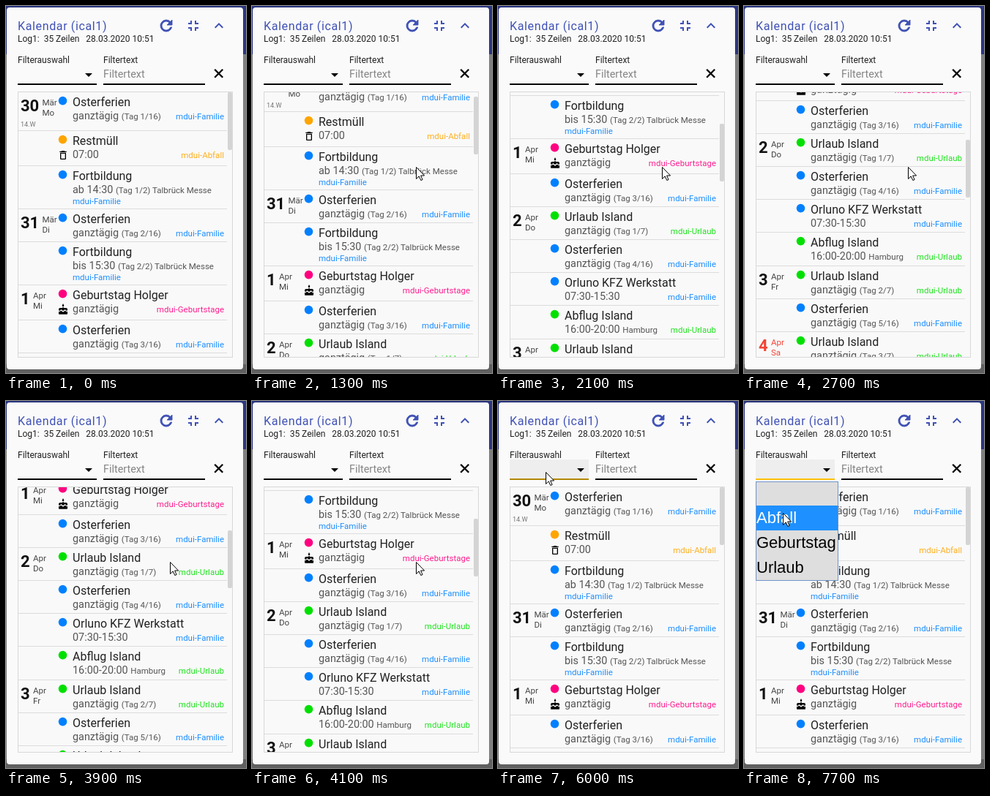
These frames come from a looping animation (328 px wide and 502 px high, 8000 ms). An HTML page:

```html
<!DOCTYPE html>
<html lang="de">
<head>
<meta charset="utf-8">
<title>Kalendar</title>
<style>
html, body { margin: 0; width: 100%; height: 100%; overflow: hidden; background: #808080; }
svg { display: block; }
text { font-family: Roboto, sans-serif; font-size: 12px; fill: #212121; white-space: pre; }
.title { font-size: 16px; }
.sub { font-size: 14.4px; fill: #555; }
.small { font-size: 11.52px; }
.tag { opacity: .88; }
.day { font-size: 22px; font-weight: 700; fill: #111; }
.head { font-size: 16px; letter-spacing: .04em; fill: #3f51b5; }
.option { font: 22px "Liberation Sans", Arial, sans-serif; fill: #000; }
</style>
</head>
<body>
<svg width="328" height="502" viewBox="0 0 328 502">
  <rect width="328" height="502" fill="#808080"/>
  <rect y="490" width="328" height="12" fill="#606060"/>
  <rect width="328" height="66" fill="#2b3780"/>
  <rect x="1" y="2" width="323" height="495" rx="4" fill="#fafafa"/>

  <text class="head" x="16" y="33">Kalendar (ical1)</text>
  <text x="16" y="49">Log1:&#160; 35 Zeilen&#160;&#160; 28.03.2020 10:51</text>
  <g fill="#3f51b5">
    <path transform="translate(207 15)" stroke="#3f51b5" stroke-width=".9" d="M17.65 6.35A8 8 0 1 0 19.73 14h-2.08A6 6 0 1 1 16.22 7.78L13 11h7V4z"/>
    <path transform="translate(244 15)" d="M5 16h3v3h2v-5H5zM8 8H5v2h5V5H8zM14 19h2v-3h3v-2h-5zM16 8V5h-2v5h5V8z"/>
    <path transform="translate(279 15)" d="M12 8l-6 6 1.4 1.4 4.6-4.6 4.6 4.6L18 14z"/>
  </g>

  <text x="16" y="78">Filterauswahl</text>
  <text x="133" y="78">Filtertext</text>
  <rect id="selectFill" x="16" y="80" width="108" height="26" fill="#eee"/>
  <rect id="selectLine" x="16" y="106" width="108" height="2"/>
  <path d="M108 92h10l-5 5z"/>
  <text x="133" y="98" style="font-size:14.4px;fill:#858585">Filtertext</text>
  <rect x="133" y="106" width="139" height="2"/>
  <path d="M285.2 86.7l11 11m0-11l-11 11" stroke="#000" stroke-width="2.3"/>

  <rect x="16.5" y="117.5" width="293" height="363" fill="#f9f9f9" stroke="#d8d8d8"/>
  <svg x="17" y="118" width="292" height="362"><g id="rows"></g></svg>
  <rect id="thumb" x="303" width="6" height="79" rx="2" fill="#d4d4d4"/>

  <g id="popup">
    <rect x="16.5" y="110.5" width="112" height="135" fill="#dedede" stroke="#6f93c8"/>
    <rect id="highlight" x="17" width="111" height="34" fill="#1e90ff"/>
    <text class="option" id="abfall" x="17" y="167">Abfall</text>
    <text class="option" x="17" y="201">Geburtstag</text>
    <text class="option" x="17" y="235">Urlaub</text>
  </g>
  <path id="cursor" d="M.5.5v16l3.7-3.6 2.6 5.6 2.3-1-2.5-5.5h5z" fill="#fff" stroke="#000"/>
</svg>
<script>
const $ = id => document.getElementById(id);

const COLORS = { Familie: '#0080ff', Abfall: '#ffa500', Geburtstage: '#ff0080', Urlaub: '#00e000' };
const ICONS = {
  trash: 'M6 19a2 2 0 0 0 2 2h8a2 2 0 0 0 2-2V7H6zM8 9h8v10H8zM15.5 4l-1-1h-5l-1 1H5v2h14V4z',
  cake: 'M12 0l-2 4a2 2 0 0 0 4 0zM11 7h2v2h5a3 3 0 0 1 3 3v2l-2 1-3-3-4 3-4-3-3 3-2-1v-2a3 3 0 0 1 3-3h5z' +
    'M3 16.5h2l3-2 4 3 4-3 3 2h2V21a1 1 0 0 1-1 1H4a1 1 0 0 1-1-1z'
};

// Each event: height, category, title, time, note, and optional extras.
const event = (height, category, title, time, note = '', extra = {}) =>
  ({ height, category, title, time, note, ...extra });
const holiday = (n, extra, height = 45) =>
  event(height, 'Familie', 'Osterferien', 'ganztägig', `(Tag ${n}/16)`, extra);
const trip = (n, extra) =>
  event(45, 'Urlaub', 'Urlaub Island', 'ganztägig', `(Tag ${n}/7)`, extra);
const course = (n, time) =>
  event(59, 'Familie', 'Fortbildung', time, `(Tag ${n}/2) Talbrück Messe`, { wrap: true });

const EVENTS = [
  holiday(1, { date: '30 Mär Mo', week: '14.W' }, 53),
  event(48, 'Abfall', 'Restmüll', '07:00', '', { icon: 'trash' }),
  course(1, 'ab 14:30'),
  holiday(2, { date: '31 Mär Di' }),
  course(2, 'bis 15:30'),
  event(48, 'Geburtstage', 'Geburtstag Holger', 'ganztägig', '', { date: '1 Apr Mi', icon: 'cake' }),
  holiday(3),
  trip(1, { date: '2 Apr Do' }),
  holiday(4),
  event(45, 'Familie', 'Orluno KFZ Werkstatt', '07:30-15:30'),
  event(45, 'Urlaub', 'Abflug Island', '16:00-20:00', 'Hamburg'),
  trip(2, { date: '3 Apr Fr' }),
  holiday(5),
  trip(3, { date: '4 Apr Sa', red: true })
];
const ROW_FRACTION = .047; // row heights are slightly over a whole pixel

function dateMarkup({ date, week, red }) {
  if (!date) return '';
  const [day, month, weekday] = date.split(' ');
  const x = day.length > 1 ? 32.5 : 20;
  const fill = color => `style="fill:${red ? '#f44336' : color}"`;
  return `<text class="day" x="3" y="26" ${fill('#111')}>${day}</text>
    <text class="small" x="${x}" y="18" ${fill('#444')}>${month}</text>
    <text class="small" x="${x}" y="32" ${fill('#444')}>${weekday}</text>` +
    (week ? `<text x="3" y="47" style="font-size:9px;fill:#777">${week}</text>` : '');
}

function rowMarkup(e, top, bottom) {
  const color = COLORS[e.category];
  const tagPlace = e.wrap ? 'x="74" y="52"' : 'x="281" y="37" text-anchor="end"';
  return `<g transform="translate(0 ${top})">${dateMarkup(e)}
    <circle cx="60.5" cy="11.6" r="5.8" fill="${color}"/>
    ${e.icon ? `<path transform="translate(53 25) scale(.667)" fill-rule="evenodd" d="${ICONS[e.icon]}"/>` : ''}
    <text class="title" x="74" y="19">${e.title}</text>
    <text class="sub" x="74" y="37">${e.time} <tspan class="small">${e.note}</tspan></text>
    <text class="small tag" ${tagPlace} style="fill:${color}">mdui-${e.category}</text>
    <rect y="${bottom - top - 1}" width="285" height="1" fill="#dcdcdc"/></g>`;
}

let offset = 0;
$('rows').innerHTML = EVENTS.map(e => {
  const top = Math.round(offset);
  offset += e.height + ROW_FRACTION;
  return rowMarkup(e, top, Math.round(offset));
}).join('');

const clamp = v => Math.max(0, Math.min(1, v));
const smooth = v => v * v * (3 - 2 * v);

// start, end, scroll distance
const SCROLLS = [
  [1200, 1500, 100], [1800, 2100, 100], [2400, 2700, 100], [3800, 4100, -100], [4300, 4700, -200]
];
// time, x, y
const CURSOR = [
  [700, 313, 106], [800, 258, 175], [900, 224, 220], [5200, 224, 220], [5400, 198, 231],
  [5600, 132, 188], [5800, 80, 124], [5900, 68, 104], [6000, 65, 97], [6200, 65, 89],
  [7100, 65, 89], [7400, 60, 121], [7600, 54, 150], [7700, 53, 153]
];

function cursorAt(t) {
  const next = CURSOR.findIndex(k => k[0] > t);
  if (next < 0) return CURSOR[CURSOR.length - 1].slice(1);
  const [t0, x0, y0] = CURSOR[Math.max(0, next - 1)];
  const [t1, x1, y1] = CURSOR[next];
  const p = t1 > t0 ? (t - t0) / (t1 - t0) : 0;
  return [x0 + (x1 - x0) * p, y0 + (y1 - y0) * p].map(Math.round);
}

const show = (id, visible) => $(id).style.display = visible ? '' : 'none';

function draw(now) {
  const t = Math.floor(now % 8000 / 100) * 100;

  const scroll = Math.round(SCROLLS.reduce((sum, [start, end, distance]) =>
    sum + distance * smooth(clamp((t - start) / (end - start))), 0));
  $('rows').setAttribute('transform', `translate(0 ${-scroll})`);
  $('thumb').setAttribute('y', 118 + Math.round(scroll * .215));

  const [x, y] = cursorAt(t);
  $('cursor').setAttribute('transform', `translate(${x} ${y})`);
  show('cursor', t >= 700);

  const hover = clamp((t - 5860) / 200);
  show('selectFill', hover > 0);
  $('selectLine').setAttribute('fill', `rgb(${255 * hover}, ${193 * hover}, ${7 * hover})`);

  const onItem = y >= 143;
  show('popup', t >= 6400);
  $('highlight').setAttribute('y', onItem ? 143 : 111);
  $('highlight').setAttribute('height', onItem ? 34 : 32);
  $('abfall').style.fill = onItem ? '#fff' : '#000';

  requestAnimationFrame(() => draw(performance.now() - begin));
}
const begin = performance.now();
draw(0);
</script>
</body>
</html>
```
